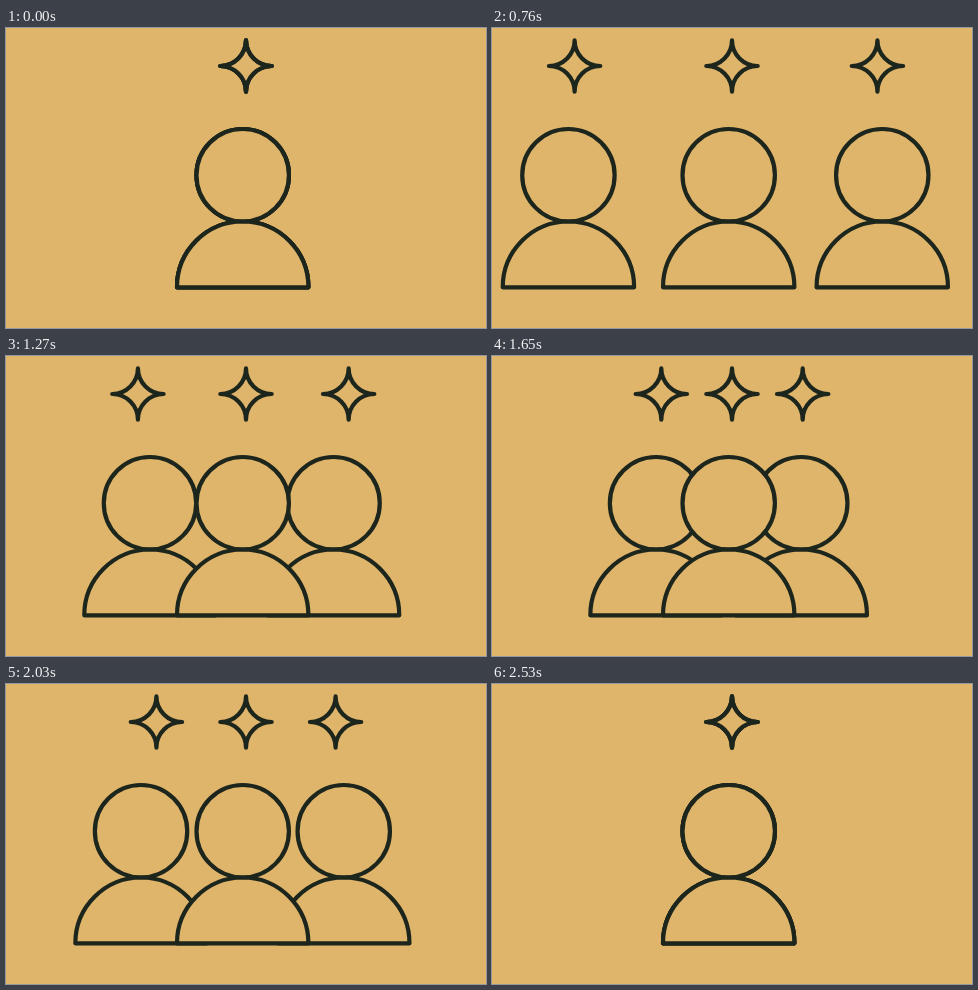
An HTML page that plays this animation: 480x300 px, repeating every 2.85 s.

```html
<!DOCTYPE html>
<html lang="en">
<head>
<meta charset="utf-8">
<title>People and sparkles</title>
<style>
  html, body { margin: 0; width: 100%; height: 100%; overflow: hidden; background: #dfb46b; }
  svg { display: block; width: 480px; height: 300px; }
  .ink { fill: #dfb46b; stroke: #1d261c; stroke-width: 4.2; stroke-linecap: round; stroke-linejoin: round; }
</style>
</head>
<body>
<svg viewBox="0 0 480 300">
  <defs>
    <g id="person">
      <path d="M171 259.3A65.7 65.8 0 0 1 302.4 259.3Z"/>
      <circle cx="236.7" cy="147.2" r="46.2"/>
    </g>
    <path id="star" d="M240 12.3A25.7 25.7 0 0 0 265.7 38A25.7 25.7 0 0 0 240 63.7A25.7 25.7 0 0 0 214.3 38A25.7 25.7 0 0 0 240 12.3Z"/>
  </defs>
  <g class="ink">
    <use href="#person" id="personL"/>
    <use href="#person" id="personR"/>
    <use href="#person"/>
    <use href="#star" id="starL"/>
    <use href="#star" id="starR"/>
    <use href="#star"/>
  </g>
</svg>
<script>
const LOOP = 2850, TICK = 30;
const easeOut = n => x => 1 - (1 - x) ** n;
const easeIn = n => x => x ** n;

// Each step: start ms, end ms, left offset, right offset, easing
const tracks = {
  person: [
    [320, 806, -160.3, 153.6, easeOut(4)],
    [860, 1330, -67, 67, easeIn(2)],
    [1620, 2150, -102.3, 101.7, easeOut(3)],
    [2190, 2520, 0, 0, easeIn(2)]
  ],
  star: [
    [320, 830, -158, 146, easeOut(3)],
    [1060, 1330, -67, 67, easeIn(2)],
    [1620, 2150, -90, 90, easeOut(3)],
    [2250, 2520, 0, 0, easeIn(2)]
  ]
};

function offsets(steps, t) {
  let left = 0, right = 0;
  for (const [start, end, l, r, ease] of steps) {
    if (t <= start) break;
    const k = ease(Math.min(1, (t - start) / (end - start)));
    left += (l - left) * k;
    right += (r - right) * k;
  }
  return [left, right];
}

const shift = (id, x) =>
  document.getElementById(id).setAttribute("transform", `translate(${x.toFixed(2)} 0)`);

function draw() {
  const t = Math.floor(performance.now() % LOOP / TICK) * TICK;
  for (const name in tracks) {
    const [left, right] = offsets(tracks[name], t);
    shift(name + "L", left);
    shift(name + "R", right);
  }
  requestAnimationFrame(draw);
}
draw();
</script>
</body>
</html>
```
